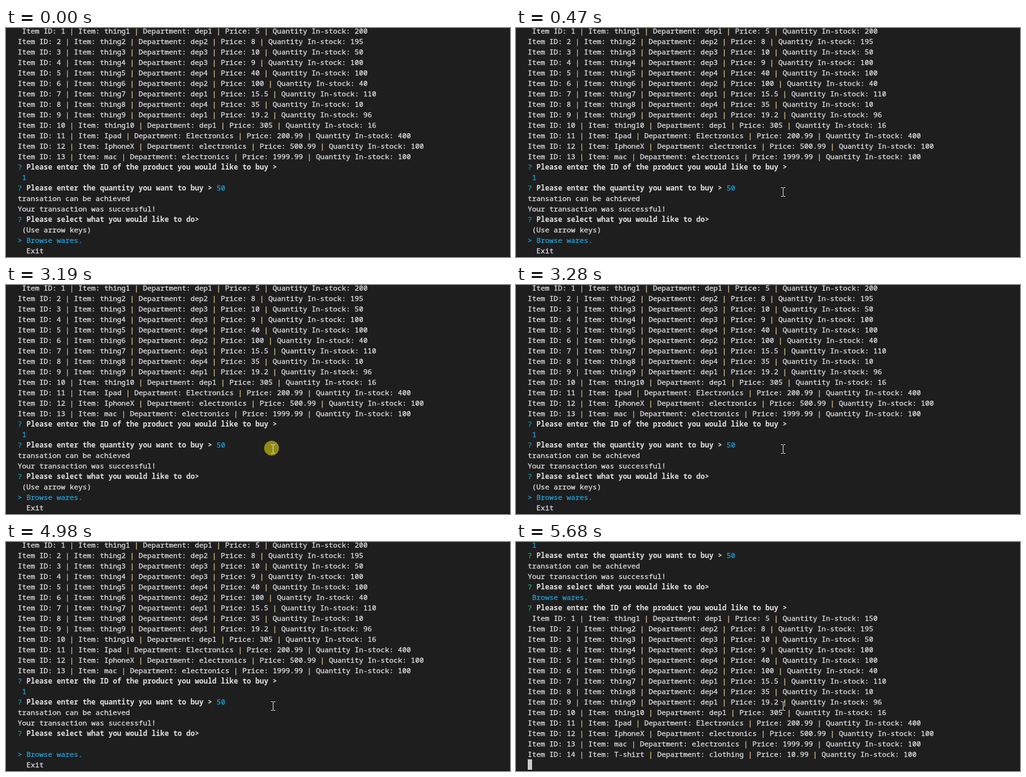
Recreate the animation shown at these times as an HTML page. Size 816 by 372 pixels, loop 8 s.

```html
<!DOCTYPE html>
<html lang="en">
<head>
<meta charset="utf-8">
<title>Store terminal</title>
<style>
  html, body { margin: 0; width: 100%; height: 100%; overflow: hidden; background: #1e1e1e; }
  svg { display: block; width: 816px; height: 372px; }
  text, tspan { fill: currentColor; stroke: currentColor; }
  text {
    font: 11.667px "Noto Sans Mono", "DejaVu Sans Mono", monospace;
    color: #dedede; stroke-width: .3px;
  }
  .bold { font-weight: 700; color: #e2e2e2; stroke-width: 0; }
  .mark { color: #1795a6; }
  .blue { color: #20a0da; }
  .pipe { color: #e4cb90; }
  #after .mark { color: #17b05c; }

  g, .timed { animation: 8s step-end infinite; }
  #before { animation-name: before; }
  #start { animation-name: start; }
  #down { animation-name: down; }
  #up { animation-name: up; }
  #after { animation-name: after; }
  #pointer { animation-name: move; }
  #click { animation-name: click; }
  #hover { animation-name: hover; }

  @keyframes before { 0% { opacity: 1 } 71%, 100% { opacity: 0 } }
  @keyframes start { 0% { opacity: 1 } 56.25%, 100% { opacity: 0 } }
  @keyframes down { 0% { opacity: 0 } 56.25% { opacity: 1 } 62.25%, 100% { opacity: 0 } }
  @keyframes up { 0% { opacity: 0 } 62.25% { opacity: 1 } 71%, 100% { opacity: 0 } }
  @keyframes after { 0% { opacity: 0 } 71%, 100% { opacity: 1 } }
  @keyframes click { 0% { opacity: 0 } 39.875% { opacity: 1 } 41%, 100% { opacity: 0 } }
  @keyframes hover { 0% { opacity: 0 } 18.5% { opacity: 1 } 39.875%, 100% { opacity: 0 } }
  @keyframes move {
    0% { opacity: 0; transform: translate(262px, 51px) }
    2.125% { opacity: 1; transform: translate(262px, 51px) }
    3.0625% { opacity: 1; transform: translate(158px, 2px) }
    4% { opacity: 1; transform: translate(73px, -27px) }
    4.9375% { opacity: 1; transform: translate(18px, -13px) }
    5.875%, 100% { opacity: 1; transform: none }
  }
</style>
</head>
<body>
<svg viewBox="0 0 816 372">
  <rect width="816" height="372" fill="#1e1e1e"/>
  <g id="before"></g>
  <g id="start"></g>
  <g id="down"></g>
  <g id="up"></g>
  <g id="after"><rect x="19" y="353" width="7" height="17" fill="#cccccc"/></g>
  <rect y="371" width="816" height="1" fill="#121212"/>
  <rect id="hover" class="timed" x="709" y="371" width="61" height="1" fill="#2c2c2c"/>
  <circle id="click" class="timed" cx="430" cy="265" r="12" fill="#918b14"/>
  <path id="pointer" class="timed" fill="none" stroke="#dedede"
    d="M429 259.5h3m1 0h3M432.5 260v13M429 273.5h3m1 0h3"/>
</svg>
<script>
  const items = [
    ['thing1', 'dep1', 5, 200], ['thing2', 'dep2', 8, 195], ['thing3', 'dep3', 10, 50],
    ['thing4', 'dep3', 9, 100], ['thing5', 'dep4', 40, 100], ['thing6', 'dep2', 100, 40],
    ['thing7', 'dep1', 15.5, 110], ['thing8', 'dep4', 35, 10], ['thing9', 'dep1', 19.2, 96],
    ['thing10', 'dep1', 305, 16], ['Ipad', 'Electronics', 200.99, 400],
    ['IphoneX', 'electronics', 500.99, 100], ['mac', 'electronics', 1999.99, 100],
    ['T-shirt', 'clothing', 10.99, 100]
  ];

  function put(group, row, col, string, style = '') {
    const node = document.createElementNS('http://www.w3.org/2000/svg', 'text');
    node.setAttribute('x', 19 + 7 * col);
    node.setAttribute('y', 9 + 17 * row);
    node.setAttribute('class', style);
    string.split(/(\|)/).forEach(part => {
      const span = document.createElementNS(node.namespaceURI, 'tspan');
      span.textContent = part;
      if (part === '|') span.setAttribute('class', 'pipe');
      node.append(span);
    });
    document.getElementById(group).append(node);
  }

  function ask(group, row, question, answer) {
    put(group, row, 0, '?', 'mark');
    put(group, row, 2, question, 'bold');
    if (answer) put(group, row, question.length + 3, answer, 'blue');
  }

  function list(group, row, count, firstStock) {
    items.slice(0, count).forEach(([name, dep, price, stock], i) => {
      const left = i ? stock : firstStock;
      put(group, row + i, i ? 0 : 1, `Item ID: ${i + 1} | Item: ${name} | Department: ${dep}` +
        ` | Price: ${price} | Quantity In-stock: ${left}`);
    });
  }

  const askId = (group, row) => ask(group, row, 'Please enter the ID of the product you would like to buy >');

  function purchase(group, row) {
    put(group, row, 1, '1', 'blue');
    ask(group, row + 1, 'Please enter the quantity you want to buy >', '50');
    put(group, row + 2, 0, 'transation can be achieved');
    put(group, row + 3, 0, 'Your transaction was successful!');
    ask(group, row + 4, 'Please select what you would like to do>');
  }

  function menu(group, selected) {
    ['Browse wares.', 'Exit'].forEach((label, i) => {
      const style = i === selected ? 'blue' : '';
      if (style) put(group, 20 + i, 0, '>', style);
      put(group, 20 + i, 2, label, style);
    });
  }

  list('before', 0, 13, 200);
  askId('before', 13);
  purchase('before', 14);

  put('start', 19, 1, '(Use arrow keys)');
  menu('start', 0);
  menu('down', 1);
  menu('up', 0);

  purchase('after', 0);
  put('after', 5, 1, 'Browse wares.', 'blue');
  askId('after', 6);
  list('after', 7, 14, 150);
</script>
</body>
</html>
```
